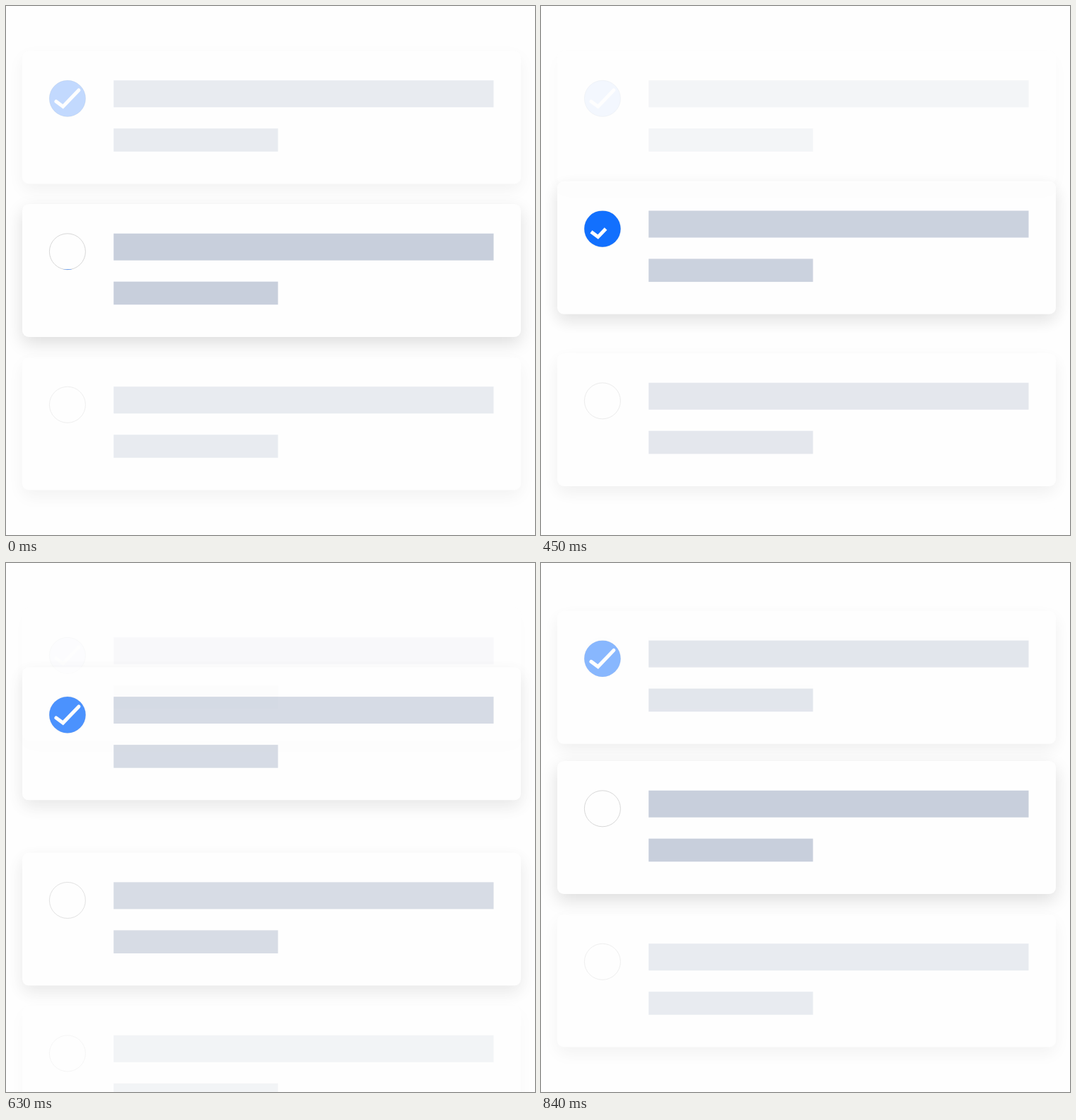
Recreate the animation shown at these times as an HTML page. Size 748 px wide and 748 px high, loop 870 ms.

```html
<!DOCTYPE html>
<html lang="en">
<head>
<meta charset="utf-8">
<title>Task list</title>
<style>
  html, body { margin: 0; width: 100%; height: 100%; overflow: hidden; background: #fefefe; }
  #stage { position: relative; width: 748px; height: 748px; overflow: hidden; }
  .card {
    position: absolute; left: 22.8px; top: 0; width: 705px; height: 188px;
    border-radius: 9px; background: #fefefe;
    box-shadow: 0 9px 24px rgba(0, 0, 0, .13);
  }
  .card svg { display: block; }
  .bar { fill: #c8cfdc; }
  .ring { fill: none; stroke: #d8d8d8; stroke-width: 1; }
  .fill { fill: #0065ff; }
  .tick { fill: none; stroke: #fefefe; stroke-width: 5; }
</style>
</head>
<body>
<div id="stage"></div>
<script>
const LOOP = 870, STEP = 30;
const FIRST = 63.4, GAP = 216.5, RADIUS = 25.7;
const MOVE = 390, FAINT = .39;
const stage = document.getElementById('stage');

const mix = (a, b, u) => a + (b - a) * u;
const ramp = (t, from, to) => Math.min(1, Math.max(0, (t - from) / (to - from)));
const slot = n => FIRST + GAP * n;

// The finished card leaves at once and settles; those below gather speed first.
const settle = p => p + p * (1 - p) * (.14 + .62 * p);
const gather = p => p * p * (1.42 - .42 * p ** 6);

// Cards in stacking order: fading out, being ticked, next, and one below the stage.
const rules = [
  t => ({ y: slot(0), alpha: FAINT * (1 - t / LOOP), tint: .6 * (1 - ramp(t, 0, 700)), level: 1, tick: 1 }),
  t => {
    const p = ramp(t, MOVE, LOOP);
    return {
      y: mix(slot(1), slot(0), settle(p)),
      alpha: mix(1, .46, p),
      tint: mix(1, .92, p),
      level: ramp(t, -4, 380),
      tick: ramp(t, 330, 520)
    };
  },
  t => waiting(t, 2, FAINT, 1),
  t => waiting(t, 3, 0, FAINT)
];

function waiting(t, n, from, to) {
  const p = ramp(t, MOVE, 840);
  return { y: mix(slot(n), slot(n - 1), gather(p)), alpha: mix(from, to, p), tint: 0, level: 0, tick: 0 };
}

function build(rule, i) {
  const el = document.createElement('div');
  el.className = 'card';
  el.innerHTML = `
    <svg width="705" height="188">
      <clipPath id="disc${i}"><circle r="${RADIUS}"/></clipPath>
      <rect class="bar" x="129.2" y="41.8" width="537.3" height="38"/>
      <rect class="bar" x="129.2" y="109.8" width="232.4" height="32.6"/>
      <g transform="translate(63.9 67.4)">
        <circle class="ring" r="25.5"/>
        <g class="mark">
          <g clip-path="url(#disc${i})"><rect class="fill" x="-60" width="120" height="120"/></g>
          <path class="tick" pathLength="1" d="M-16 4.2L-6.3 11.4L16 -11.8"/>
        </g>
      </g>
    </svg>`;
  stage.append(el);
  const [mark, fill, tick] = ['mark', 'fill', 'tick'].map(name => el.querySelector('.' + name));

  return t => {
    const s = rule(t);
    el.style.transform = `translateY(${s.y}px)`;
    el.style.opacity = s.alpha;
    mark.style.opacity = s.tint;
    fill.setAttribute('transform', `translate(0 ${mix(RADIUS, -RADIUS, s.level)}) rotate(-1.7)`);
    tick.style.visibility = s.tick ? 'visible' : 'hidden';
    tick.style.strokeDasharray = s.tick < 1 ? `${s.tick} 2` : 'none';
    tick.style.strokeLinecap = s.tick > .9 ? 'round' : 'butt';
  };
}

const draws = rules.map(build);
const start = performance.now();

function frame() {
  const now = Math.max(0, performance.now() - start) + 2;
  const t = Math.floor(now % LOOP / STEP) * STEP;
  draws.forEach(draw => draw(t));
  requestAnimationFrame(frame);
}
frame();
</script>
</body>
</html>
```
